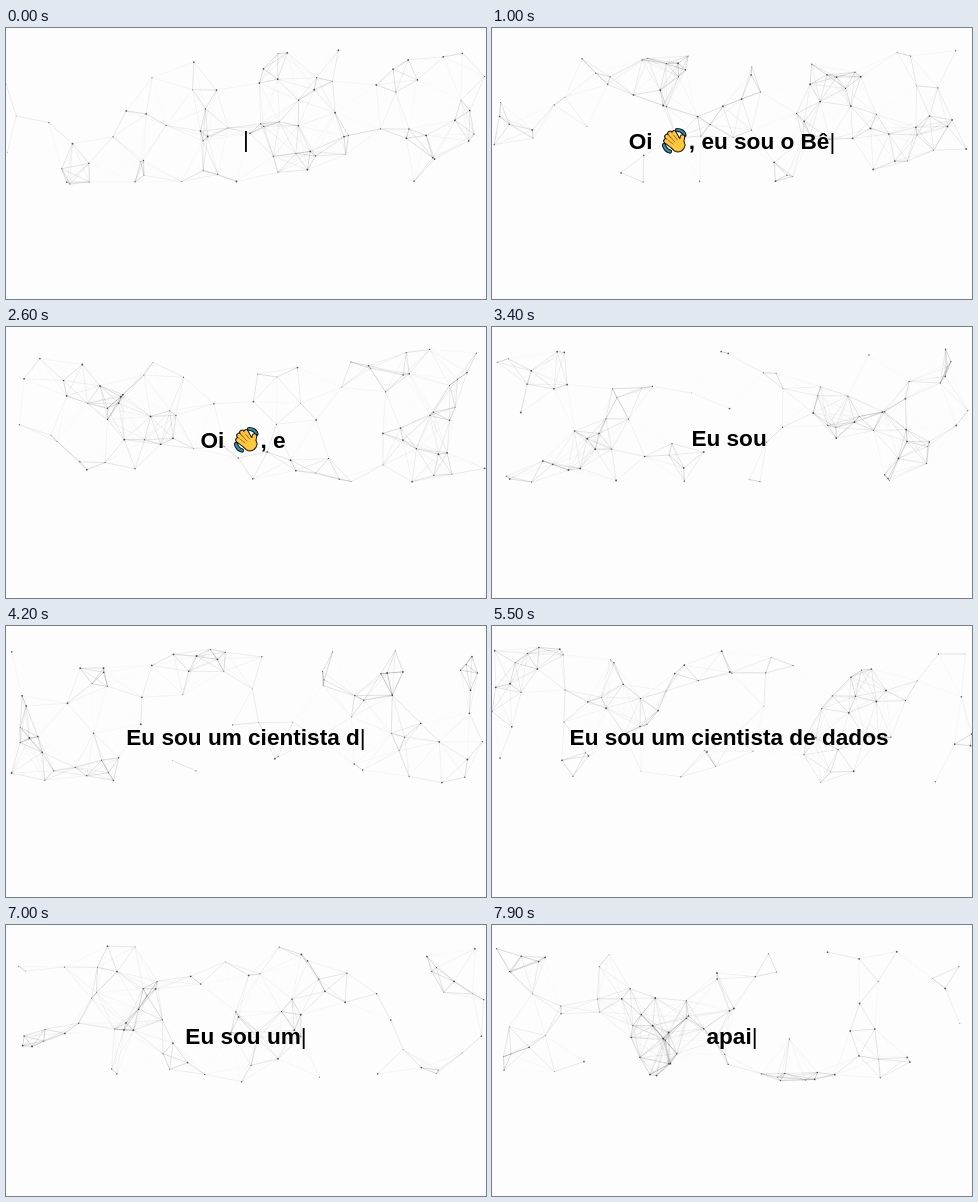
Write an HTML page with a canvas that moves like this. It is 480 px wide and 271 px high and loops after 8 s.

```html
<!DOCTYPE html>
<html lang="pt">
<head>
<meta charset="utf-8">
<style>
html, body { margin: 0; width: 100%; height: 100%; overflow: hidden; background: #fefdfe; }
canvas { position: absolute; left: 0; top: 0; }
#line {
  position: absolute; left: 0; top: 99.2px; width: 480px;
  font: bold 22.6px/26px "Liberation Sans", Arial, sans-serif;
  text-align: center; white-space: pre; color: #000;
}
#line svg { width: 30px; height: 28px; margin: -6px 0; vertical-align: baseline; }
#caret { font-weight: normal; }
</style>
</head>
<body>
<canvas id="net" width="480" height="271"></canvas>
<div id="line"><span id="text"></span><span id="caret">|</span></div>
<script>
const LOOP = 8000, STEP = 100;
const TYPE = 53, ERASE = 65;          // ms per character
const WIDTH = 480, TOP = 21, BOTTOM = 157;
const DOTS = 76, REACH = 54, SPEED = 0.09;   // SPEED in px per ms

const phrases = [
  { text: 'Oi 👋, eu sou o Bê', start: 0, erase: 1924 },
  { text: 'Eu sou um cientista de dados', start: 3066, erase: 5719 },
  { text: 'apaixonado', start: 7667, erase: Infinity }
];

const fingers = 'M15 20L7 14M16 18L8 9.500M18 16L11 6.500M20 15L15 6M22 17L23.500 10';
const waves = 'M5 18q1 5 6 6.500M18 3q6 0 7.500 5';
const hand = `<svg viewBox="0 0 30 28" fill="none" stroke-linecap="round" stroke-linejoin="round">
  <path d="${waves}" stroke="#111" stroke-width="4.200"/>
  <path d="${waves}" stroke="#2f93ad" stroke-width="2.200"/>
  <g fill="#111" stroke="#111">
    <path d="${fingers}" stroke-width="5.600"/><circle cx="19" cy="18" r="7"/>
  </g>
  <g fill="#ffc83d" stroke="#ffc83d">
    <path d="${fingers}" stroke-width="3.600"/><circle cx="19" cy="18" r="6"/>
  </g>
  <path d="M9 13L14 17M11 9.500L16 15M14.500 8L18.500 13" stroke="#6b4a12" stroke-width=".7"/>
</svg>`;

let seed = 20240607;
const random = () => (seed = seed * 16807 % 2147483647) / 2147483647;
const clamp = (v, lo, hi) => Math.max(lo, Math.min(hi, v));
const wrap = (v, size) => ((v % size) + size) % size;

const dots = Array.from({ length: DOTS }, () => ({
  x: random() * WIDTH,
  y: random() * (BOTTOM - TOP),
  vx: (random() * 2 - 1) * SPEED,
  vy: (random() * 2 - 1) * SPEED,
  r: 0.35 + random() * 0.65
}));

const ctx = document.getElementById('net').getContext('2d');
const line = document.getElementById('line');
const text = document.getElementById('text');
const caret = document.getElementById('caret');

function drawNet(t) {
  ctx.clearRect(0, 0, WIDTH, 271);
  const now = dots.map(d => ({
    x: wrap(d.x + d.vx * t, WIDTH),
    y: TOP + wrap(d.y + d.vy * t, BOTTOM - TOP),
    r: d.r
  }));
  ctx.lineWidth = 0.5;
  ctx.fillStyle = 'rgba(0,0,0,.6)';
  now.forEach((a, i) => {
    for (const b of now.slice(i + 1)) {
      const gap = Math.hypot(a.x - b.x, a.y - b.y);
      if (gap >= REACH) continue;
      ctx.strokeStyle = `rgba(0,0,0,${0.4 * (1 - gap / REACH)})`;
      ctx.beginPath();
      ctx.moveTo(a.x, a.y);
      ctx.lineTo(b.x, b.y);
      ctx.stroke();
    }
    ctx.beginPath();
    ctx.arc(a.x, a.y, a.r, 0, 2 * Math.PI);
    ctx.fill();
  });
}

function drawText(t) {
  const phrase = phrases.filter(p => t >= p.start).pop();
  const chars = [...phrase.text];
  const typed = Math.min(chars.length, Math.floor((t - phrase.start) / TYPE));
  const erased = Math.max(0, Math.floor((t - phrase.erase) / ERASE));
  const shown = chars.slice(0, Math.max(0, typed - erased)).join('');
  text.innerHTML = shown.replace('👋', hand);
  line.style.top = (shown.includes('👋') ? 100.7 : 99.2) + 'px';
  caret.style.opacity = clamp(0.5 + 1.2 * Math.cos(2 * Math.PI * (t / 1000 - 0.06)), 0, 1);
}

let last = -1;
const begin = performance.now();
function frame() {
  const t = Math.floor((performance.now() - begin) % LOOP / STEP) * STEP;
  if (t !== last) {
    drawNet(t);
    drawText(t);
    last = t;
  }
  requestAnimationFrame(frame);
}
frame();
</script>
</body>
</html>
```
